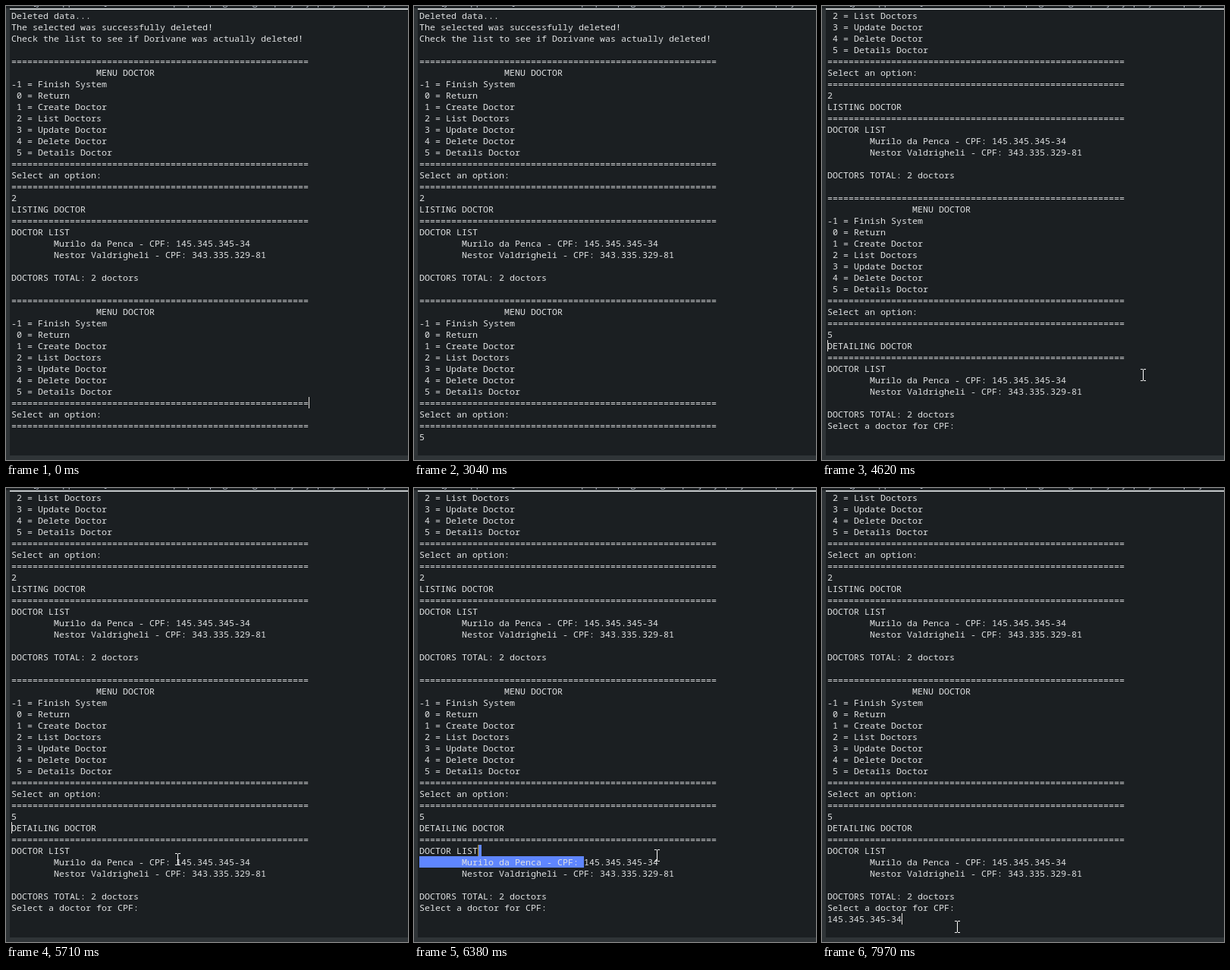
An HTML page with a canvas that plays this animation: 530 by 598 pixels, repeating every 8000 ms.

```html
<!DOCTYPE html>
<html lang="en">
<head>
<meta charset="utf-8">
<title>Doctor console</title>
<style>
  html, body { margin: 0; width: 100%; height: 100%; overflow: hidden; background: #1b1f22; }
  canvas { display: block; }
</style>
</head>
<body>
<canvas id="stage" width="530" height="598"></canvas>
<script>
const ctx = document.getElementById('stage').getContext('2d');
const LOOP = 8000, LEFT = 7, TOP = 5, COL = 7, ROW = 15;
const TEXT = '#e0e2e3', EDGE = '#2f3437';

const rule = '='.repeat(56);
const cpf = '145.345.345-34';
const menu = [
  rule, ' '.repeat(16) + 'MENU DOCTOR',
  '-1 = Finish System', ' 0 = Return', ' 1 = Create Doctor', ' 2 = List Doctors',
  ' 3 = Update Doctor', ' 4 = Delete Doctor', ' 5 = Details Doctor',
  rule, 'Select an option: ', rule
];
const doctors = [
  rule, 'DOCTOR LIST',
  `        Murilo da Penca - CPF: ${cpf}`,
  '        Nestor Valdrigheli - CPF: 343.335.329-81',
  '', 'DOCTORS TOTAL: 2 doctors'
];
const before = [
  'Deleted data...', 'The selected was successfully deleted!',
  'Check the list to see if Dorivane was actually deleted!', '',
  ...menu, '2', 'LISTING DOCTOR', ...doctors, '', ...menu
];
const detailed = [...before, '5', 'DETAILING DOCTOR', ...doctors, 'Select a doctor for CPF:'];

// Each step holds from its start time until the next one.
const screens = [
  [0, before], [2460, [...before, '5']],
  [3190, detailed.slice(9)], [7970, [...detailed, cpf].slice(9)]
];
// time, column, row; no column means hidden
const caret = [
  [0, 56, 34], [150], [760, 56, 34], [1160], [1760, 56, 34],
  [2340, 0, 37], [2460, 1, 37], [3040],
  [3190, 0, 29], [3740], [4320, 0, 29], [4870], [5290, 0, 29], [5860],
  [6010, 31, 32], [6130, 37, 32], [6260, 42, 32], [6380, 11, 31], [6520, 45, 32],
  [7080], [7500, 45, 32], [7650, 0, 37], [7970, 14, 37]
];
// time, left, top
const pointer = [
  [0], [4320, 509, 482], [4470, 473, 480], [4620, 420, 478], [4740, 362, 476],
  [4870, 312, 475], [4990, 273, 475], [5140, 263, 478], [5290, 242, 483],
  [5440, 229, 483], [5590, 225, 482], [5710, 223, 481], [5860, 224, 484],
  [6010, 232, 484], [6130, 262, 482], [6260, 298, 479], [6380, 317, 476],
  [6520, 323, 484], [6950, 316, 481], [7080, 300, 491], [7230, 242, 525],
  [7350, 196, 544], [7500, 175, 569], [7650, 175, 570]
];
// time, column the selection reaches; below the anchor it runs into the row above
const ANCHOR = 31, SELECTED_ROW = 32;
const selection = [[0, ANCHOR], [6130, 37], [6260, 42], [6380, 11], [6520, 45], [7650, ANCHOR]];

const at = (steps, time) => steps.findLast(step => step[0] <= time);
const x = col => LEFT + col * COL;
const y = row => TOP + row * ROW;

function rect(color, left, top, width, height) {
  ctx.fillStyle = color;
  ctx.fillRect(left, top, width, height);
}

function drawFrame() {
  rect('#1b1f22', 0, 0, 530, 598);
  ctx.fillStyle = '#b9c0cc';
  ctx.font = '12px "Open Sans", sans-serif';
  ctx.fillText('Main [Java Application] C:\\Users\\user\\.p2\\pool\\plugins\\org.eclipse.justj.openjdk.hotspot.jre.full', 5, -1);
  rect(EDGE, 0, 3, 5, 595);
  rect(EDGE, 0, 592, 530, 6);
  rect('#c4c8ca', 5, 3, 525, 2);
}

function drawSelection(end) {
  const color = '#5f86ff';
  if (end >= ANCHOR) {
    rect(color, x(ANCHOR), y(SELECTED_ROW), (end - ANCHOR) * COL, ROW);
  } else {
    rect(color, x(end), y(SELECTED_ROW - 1), 5, ROW);
    rect(color, LEFT, y(SELECTED_ROW), ANCHOR * COL, ROW);
  }
}

function drawText(lines) {
  ctx.fillStyle = TEXT;
  ctx.font = '11.667px "Noto Sans Mono", "DejaVu Sans Mono", monospace';
  lines.forEach((line, row) =>
    [...line].forEach((char, col) => ctx.fillText(char, x(col), y(row) + 12)));
}

function drawCaret(col, row) {
  if (col === undefined) return;
  ctx.globalCompositeOperation = 'difference';
  rect('#fff', x(col), y(row), 1, ROW);
  ctx.globalCompositeOperation = 'source-over';
}

function drawPointer(left, top) {
  if (left === undefined) return;
  for (const edge of [top, top + 15]) {
    rect('#fff', left, edge, 3, 1);
    rect('#fff', left + 4, edge, 3, 1);
  }
  rect('#fff', left + 3, top + 1, 1, 14);
}

function draw(now) {
  const time = now % LOOP;
  drawFrame();
  drawSelection(at(selection, time)[1]);
  drawText(at(screens, time)[1]);
  drawCaret(...at(caret, time).slice(1));
  drawPointer(...at(pointer, time).slice(1));
}

const start = performance.now();
function tick() {
  draw(performance.now() - start);
  requestAnimationFrame(tick);
}
tick();
</script>
</body>
</html>
```
